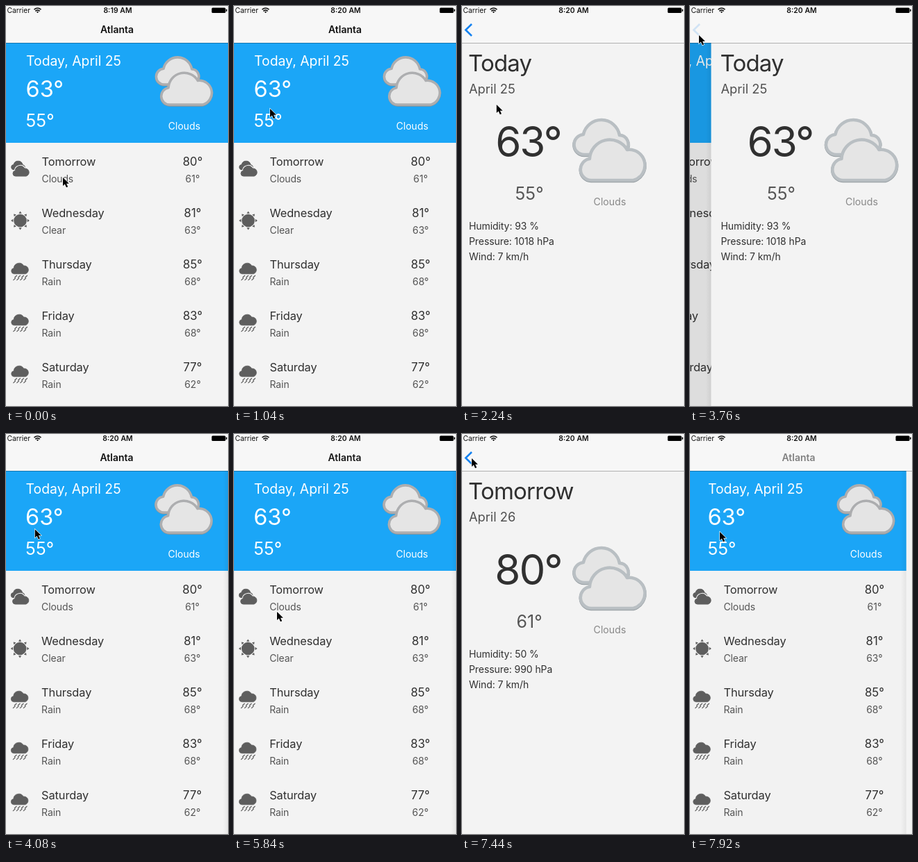
Write an HTML page that moves like this. It is 320 px wide and 576 px high and loops after 8 s.

```html
<!DOCTYPE html>
<html lang="en">
<head>
<meta charset="utf-8">
<title>Weather</title>
<style>
  html, body { margin: 0; width: 100%; height: 100%; overflow: hidden; background: #f3f3f3; }
  svg { display: block; width: 100vw; height: 100vh; }
  text { font-family: Inter, "Liberation Sans", sans-serif; white-space: pre; }
</style>
</head>
<body>
<svg id="stage" viewBox="0 0 320 576"></svg>
<script>
const LOOP = 8000, STEP = 80;
const WIDTH = 326;   // the screen reaches a little past both sides of the stage
const BG = '#f3f3f3', INK = '#303030', SOFT = '#555', ICON = '#5e5e5e';

const BACK_CLOUD = 'M17 51A14.52 14.52 0 0 1 16 22A26.5 26.5 0 0 1 68 23A13 13 0 0 1 78 44L70 51Z';
const FRONT_CLOUD = 'M27 88A15.6 15.6 0 0 1 25 57A29 29 0 0 1 79 44A22.5 22.5 0 0 1 88 88Z';

function text(x, y, size, content, { fill = INK, anchor = 'start', weight = 400, gap = 0, id = '' } = {}) {
  return `<text ${id && `id="${id}"`} x="${x}" y="${y}" font-size="${size}" fill="${fill}" ` +
    `text-anchor="${anchor}" font-weight="${weight}" letter-spacing="${gap}">${content}</text>`;
}

function bigClouds(x, y, scale, stroke, shade) {
  const cloud = d => `
    <path d="${d}" transform="translate(0 1)" fill="${shade}" stroke="${shade}" stroke-width="4.5"/>
    <path d="${d}" fill="#e5e5e5" stroke="${stroke}" stroke-width="4.5"/>`;
  return `<g transform="translate(${x} ${y}) scale(${scale})" stroke-linejoin="round">
    ${cloud(BACK_CLOUD)}${cloud(FRONT_CLOUD)}</g>`;
}

const icons = {
  Clouds: () => `<g transform="translate(7 -1) scale(.25)" fill="${ICON}">
    <path d="${BACK_CLOUD}" stroke="${ICON}" stroke-width="4"/>
    <path d="${FRONT_CLOUD}" stroke="${BG}" stroke-width="12"/>
    <path d="${FRONT_CLOUD}" stroke="${ICON}" stroke-width="4"/></g>`,
  Clear: () => {
    const rays = Array.from({ length: 8 }, (_, i) =>
      `<path d="M-2.2-10.2L0-13.4L2.2-10.2Z" transform="rotate(${i * 45})"/>`).join('');
    return `<g transform="translate(20.5 11)" fill="${ICON}"><circle r="9.3"/>${rays}</g>`;
  },
  Rain: () => {
    const drops = [0, 1, 2, 3].map(i =>
      `M${15.5 + i * 5} 16.2l-2.8 2.6M${13.5 + i * 5} 20l-2.8 2.6`).join('');
    return `<path d="${FRONT_CLOUD}" transform="translate(4.6 -9.6) scale(.265)" fill="${ICON}" stroke="${ICON}" stroke-width="3"/>
      <path d="${drops}" stroke="${ICON}" stroke-width="1.2" stroke-linecap="round"/>`;
  }
};

function row([day, sky, high, low], i) {
  const mid = { anchor: 'middle' };
  return `<g transform="translate(0 ${224 + i * 74})">
    ${icons[sky]()}
    ${text(51.5, 6, 16.4, day, { gap: -.1 })}
    ${text(51.5, 30, 14, sky, { fill: SOFT, gap: -.1 })}
    ${text(269, 6, 16.8, high + '°', mid)}
    ${text(269, 30, 14, low + '°', { ...mid, fill: SOFT })}</g>`;
}

function list() {
  const white = { fill: '#fff' };
  const days = [
    ['Tomorrow', 'Clouds', 80, 61], ['Wednesday', 'Clear', 81, 63], ['Thursday', 'Rain', 85, 68],
    ['Friday', 'Rain', 83, 68], ['Saturday', 'Rain', 77, 62]
  ];
  return `<rect x="-4" y="53" width="${WIDTH + 100}" height="523" fill="${BG}"/>
    <rect x="-4" y="53" width="${WIDTH + 100}" height="144" fill="#1ba6f7"/>
    ${text(29, 86, 19.4, 'Today, April 25', white)}
    ${text(28.5, 131, 32.5, '63°', white)}
    ${text(28.5, 173.5, 25, '55°', white)}
    ${text(257, 178, 14, 'Clouds', { ...white, anchor: 'middle' })}
    ${bigClouds(214.5, 73, .785, '#adaeb0', '#8d9194')}
    ${days.map(row).join('')}`;
}

function detail({ day, date, high, low, facts }) {
  return text(9, 94, 33, day, { gap: -.8 }) +
    text(10, 125.5, 18.3, date, { fill: '#505050' }) +
    text(95.5, 217, 60, high + '°', { anchor: 'middle', gap: -2 }) +
    text(97, 279, 25, low + '°', { anchor: 'middle', fill: SOFT }) +
    text(213, 287, 14.2, 'Clouds', { anchor: 'middle', fill: '#888' }) +
    bigClouds(159, 163, 1, '#b9bfc3', '#929a9f') +
    facts.map((fact, i) => text(10, 322 + i * 22, 14, fact, { gap: -.08 })).join('');
}

const forecasts = [
  { day: 'Today', date: 'April 25', high: 63, low: 55,
    facts: ['Humidity: 93 %', 'Pressure: 1018 hPa', 'Wind: 7 km/h'] },
  { day: 'Tomorrow', date: 'April 26', high: 80, low: 61,
    facts: ['Humidity: 50 %', 'Pressure: 990 hPa', 'Wind: 7 km/h'] }
];

const stage = document.getElementById('stage');
stage.innerHTML = `
  <defs><linearGradient id="edge"><stop stop-color="#000" stop-opacity="0"/>
    <stop offset="1" stop-color="#000" stop-opacity=".06"/></linearGradient></defs>
  <rect width="320" height="576" fill="${BG}"/>
  <g id="list">${list()}</g>
  <rect id="dim" y="53" width="320" height="523"/>
  <g id="page">
    <rect x="-12" y="53" width="8" height="523" fill="url(#edge)"/>
    <rect x="-4" y="53" width="${WIDTH + 4}" height="523" fill="${BG}"/>
    ${forecasts.map((f, i) => `<g id="forecast${i}">${detail(f)}</g>`).join('')}
  </g>
  <rect width="320" height="53" fill="#f7f7f7"/>
  <rect y="53" width="320" height="1" fill="#000" opacity=".28"/>
  ${text(1.5, 10, 10.3, 'Carrier', { fill: '#111' })}
  <path d="M40.5 5.2Q45.5.8 50.5 5.2M42.3 7.3Q45.5 4.6 48.7 7.3" fill="none" stroke="#111" stroke-width="1.6"/>
  <path d="M43.8 8.2L45.5 10.2L47.2 8.2Q45.5 7.2 43.8 8.2Z" fill="#111"/>
  ${text(161, 10, 10.5, '', { fill: '#111', anchor: 'middle', weight: 600, id: 'clock' })}
  <rect x="296.5" y="2.5" width="20" height="7.5" rx="1.5"/>
  <rect x="317" y="4.5" width="1.5" height="3.5" rx=".7"/>
  ${text(160, 39, 14, 'Atlanta', { fill: '#111', anchor: 'middle', weight: 600, id: 'title' })}
  <path id="chevron" d="M14 26L5.3 34.5L14 43" fill="none" stroke="#1482f0" stroke-width="2.6"/>
  <path id="cursor" d="M0 0V12L2.8 9.5L5 14.3L7.2 13.3L5.1 8.8H8.9Z" stroke="#fff" stroke-width="1.2" paint-order="stroke"/>`;

const parts = Object.fromEntries([...stage.querySelectorAll('[id]')].map(el => [el.id, el]));

const clamp = v => Math.min(1, Math.max(0, v));
const smooth = v => v * v * (3 - 2 * v);
// Critically damped spring: the distance left, from 1 to 0
const spring = ms => ms <= 0 ? 1 : (1 + .022 * ms) * Math.exp(-.022 * ms);

const visits = [
  { push: 1303, press: 3360, pop: 3735 },
  { push: 5836, press: 7590, pop: 7679 }
];

// Cursor moves: start, end, target x, target y
const moves = [
  [0, 0, 82, 247], [60, 800, 52, 148], [2160, 2720, 12, 39], [3720, 4100, 42, 138],
  [4600, 5360, 62, 256], [6360, 6700, 28, 84], [6760, 7200, 14, 35], [7640, 7900, 43, 141]
];

function cursorAt(t) {
  let x = 0, y = 0;
  for (const [start, end, toX, toY] of moves) {
    if (t < start) break;
    const k = end > start ? smooth(clamp((t - start) / (end - start))) : 1;
    x += (toX - x) * k;
    y += (toY - y) * k;
  }
  return [x, y];
}

function navigation(t) {
  const index = t < 5000 ? 0 : 1;
  const { push, press, pop } = visits[index];
  const popping = t >= pop;
  const since = t - (popping ? pop : push);
  return {
    index,
    shown: popping ? spring(since) : 1 - spring(since),
    title: popping ? clamp((since - 180) / 120) : clamp(1 - since / 150),
    chevron: popping ? .2 * clamp(1 - since / 150)
      : t >= press ? .2 : clamp((since - 120) / 160)
  };
}

const move = (el, x, y = 0) => el.setAttribute('transform', `translate(${x.toFixed(2)} ${y.toFixed(2)})`);

function render(t) {
  const nav = navigation(t);
  move(parts.list, -97 * nav.shown);
  move(parts.page, WIDTH * (1 - nav.shown));
  move(parts.title, -111 * nav.shown);
  move(parts.cursor, ...cursorAt(t));
  parts.dim.setAttribute('opacity', .1 * nav.shown);
  parts.page.setAttribute('display', nav.shown > .001 ? 'inline' : 'none');
  forecasts.forEach((_, i) =>
    parts['forecast' + i].setAttribute('display', i === nav.index ? 'inline' : 'none'));
  parts.title.setAttribute('opacity', nav.title);
  parts.chevron.setAttribute('opacity', nav.chevron);
  parts.clock.textContent = t < 480 ? '8:19 AM' : '8:20 AM';
}

const began = performance.now();
function tick() {
  const t = (performance.now() - began) % LOOP;
  render(Math.floor(t / STEP) * STEP);
  requestAnimationFrame(tick);
}
tick();
</script>
</body>
</html>
```
